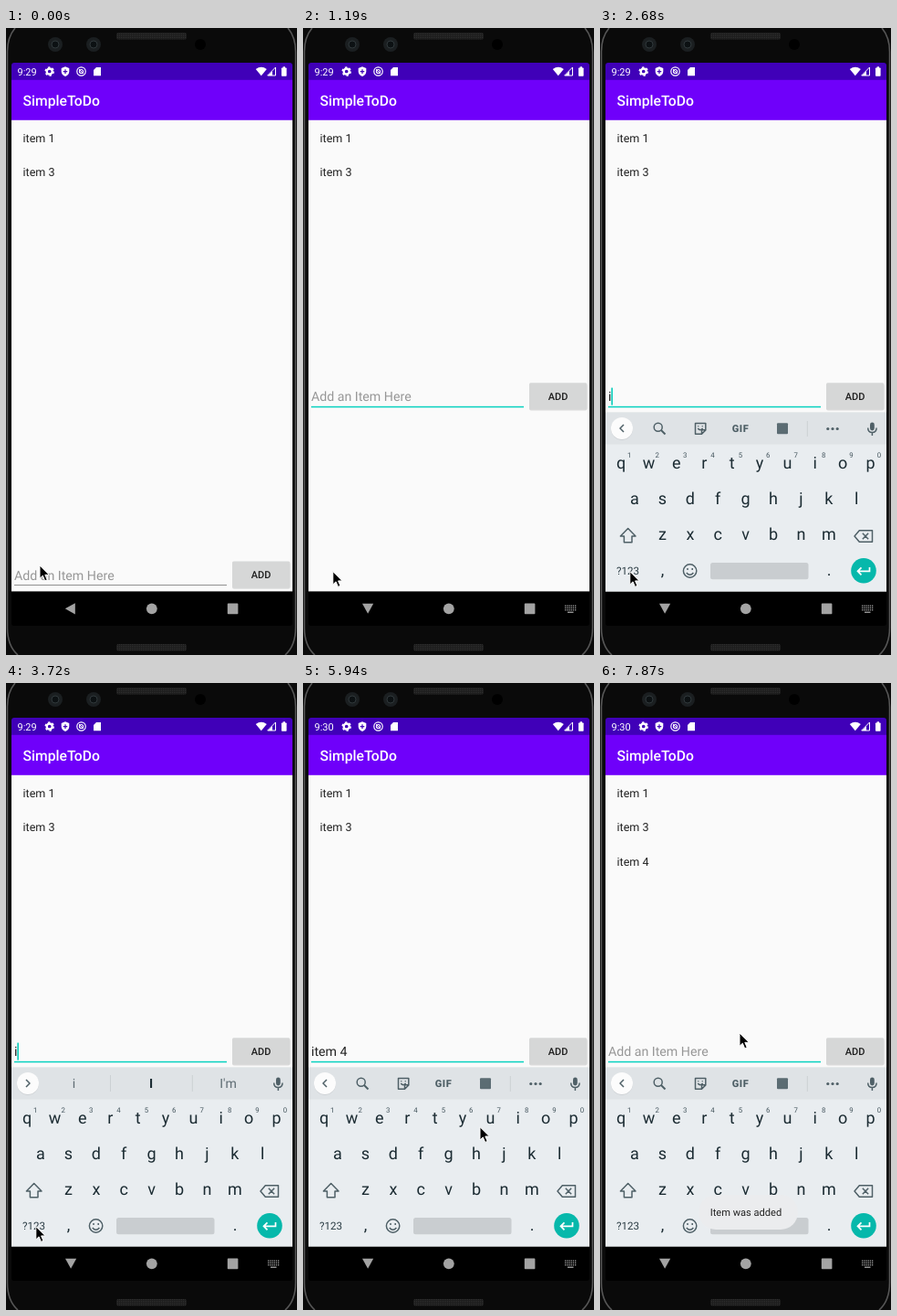
An HTML page that plays this animation: 319x686 px, repeating every 8000 ms.

```html
<!DOCTYPE html>
<html lang="en">
<head>
<meta charset="utf-8">
<title>To-do demo</title>
<style>
  html, body { margin: 0; width: 100%; height: 100%; overflow: hidden; background: #0a0a0a; }
  svg { display: block; width: 100%; height: 100%; }
  text { font-family: Roboto, sans-serif; white-space: pre; text-rendering: geometricPrecision; }
  .mid { text-anchor: middle; }
  .item { font-size: 12.55px; fill: #222; }
  .edit { font-size: 14.2px; }
  .key { font-size: 18px; fill: #1b2b32; text-anchor: middle; }
  .num { font-size: 7.8px; fill: #43545c; text-anchor: middle; }
  .word { font-size: 14.1px; fill: #5d6b72; text-anchor: middle; }
  .line { fill: none; stroke: #4f6067; stroke-width: 1.5; stroke-linejoin: round; }
</style>
</head>
<body>
<svg viewBox="0 0 319 686" preserveAspectRatio="none">
  <defs>
    <pattern id="mesh" width="2" height="2" patternUnits="userSpaceOnUse">
      <rect width="2" height="2" fill="#1d1d1d"/><rect width="1" height="1" fill="#303030"/>
    </pattern>
    <clipPath id="screen"><rect x="6" y="38" width="308" height="616" rx="3"/></clipPath>
    <clipPath id="app"><rect x="6" y="38" width="308" height="578.4"/></clipPath>
  </defs>

  <!-- phone body -->
  <rect width="319" height="686" fill="#0a0a0a"/>
  <g fill="none" stroke="#575757" stroke-width="1.6">
    <path d="M10 0Q1.5 10 1.5 26V656Q1.5 676 13 686"/>
    <path d="M309 0Q317.5 10 317.5 26V656Q317.5 676 306 686"/>
  </g>
  <rect x="121" y="5" width="77" height="7.5" rx="2" fill="url(#mesh)"/>
  <rect x="121" y="674" width="77" height="7.5" rx="2" fill="url(#mesh)"/>
  <g fill="#1b1f21">
    <circle cx="54" cy="18" r="8"/><circle cx="96" cy="18" r="8"/>
  </g>
  <g fill="#0c1113" stroke="#30383b">
    <circle cx="54" cy="18" r="4"/><circle cx="96" cy="18" r="4"/>
  </g>
  <circle cx="213" cy="18" r="6" fill="#000"/>

  <g clip-path="url(#screen)">
    <rect x="6" y="38" width="308" height="616" fill="#000"/>
    <rect x="6" y="57" width="308" height="559.4" fill="#fafafa"/>
    <rect x="6" y="38" width="308" height="19" fill="#4000b8"/>
    <rect x="6" y="56.8" width="308" height="44" fill="#6f00fa"/>

    <!-- status bar -->
    <text id="clock" x="12.5" y="51.5" font-size="11" fill="#fff"></text>
    <g fill="#fff">
      <circle cx="47.7" cy="47.5" r="3" fill="none" stroke="#fff" stroke-width="2.3"/>
      <circle cx="47.7" cy="47.5" r="4.5" fill="none" stroke="#fff" stroke-width="1.5" stroke-dasharray="2.4 2.31"/>
      <path d="M65 42.3L69.3 44V47.5Q69.3 51.3 65 53Q60.7 51.3 60.7 47.5V44Z"/>
      <path d="M65 45.2V50M62.7 47.6H67.3" stroke="#4000b8" stroke-width="1.2"/>
      <circle cx="82.5" cy="47.5" r="4.7" fill="none" stroke="#fff" stroke-width="1.2"/>
      <circle cx="82.5" cy="47.5" r="2" fill="none" stroke="#fff" stroke-width="1.2"/>
      <path d="M80 45L85 50" stroke="#fff"/>
      <path d="M99 43H104V52.3H96V46Z"/>
      <path d="M273.8 45Q279.8 40.7 285.8 45L279.8 52.3Z"/>
      <path d="M295.5 43V52H286.7Z" fill="none" stroke="#fff"/>
      <path d="M292 47V52H287.5Z"/>
      <rect x="302" y="43.5" width="5.6" height="9.3" rx=".7"/><rect x="303.6" y="42.3" width="2.4" height="2"/>
    </g>

    <text x="18.5" y="85" font-size="15.7" font-weight="500" fill="#fff">SimpleToDo</text>
    <text class="item" x="18.5" y="124.5">item 1</text>
    <text class="item" x="18.5" y="162">item 3</text>
    <text class="item" id="added" x="18.5" y="199.7">item 4</text>
    <rect id="ghost" x="49" y="323" width="242" height="57" fill="#f9f9f9"/>

    <!-- input row -->
    <g id="row">
      <text class="edit" id="hint" x="9" y="408.3" fill="#979797">Add an Item Here</text>
      <text class="edit" id="field" x="9" y="408.3" fill="#212121"></text>
      <rect id="under" x="9" width="233"/>
      <rect id="caret" y="393.6" width="1.6" height="19" fill="#08cdbb"/>
      <rect x="248" y="389.5" width="63.5" height="29" rx="2" fill="#000" opacity=".13"/>
      <rect id="button" x="248" y="388.2" width="63.3" height="29" rx="1.5"/>
      <text class="mid" x="279.6" y="406.6" font-size="11" font-weight="500" fill="#1c1c1c">ADD</text>
    </g>

    <!-- keyboard -->
    <g clip-path="url(#app)"><g id="board">
      <rect x="6" y="420.5" width="308" height="198" fill="#e9edf0"/>
      <rect x="6" y="420.5" width="308" height="35" fill="#dfe3e6"/>
      <circle cx="24" cy="438.8" r="12" fill="#c9cdd0"/>
      <circle cx="24" cy="438" r="12" fill="#fcfcfc"/>
      <path class="line" id="chevron"/>
      <g id="tools">
        <g class="line">
          <circle cx="63.7" cy="436.7" r="4.5"/><path d="M67 440L71.5 444.5" stroke-width="2"/>
          <path d="M104.5 432.5H115.8V440L111.5 444.3H104.5Z M115.8 439.8H111.5V444.3 M107.3 438Q109.8 441.5 112.7 438"/>
          <path d="M107.7 435.3V436.3M112.3 435.3V436.3"/>
        </g>
        <text class="mid" x="154" y="442.3" font-size="11" font-weight="900" letter-spacing=".6" fill="#4f6067">GIF</text>
        <rect x="194" y="432.3" width="12" height="12" rx="1" fill="#5b6c73"/>
        <path d="M227.3 430V447" stroke="#cbd0d3"/>
        <g fill="#4f6067">
          <circle cx="249.8" cy="438.5" r="1.6"/><circle cx="255" cy="438.5" r="1.6"/><circle cx="260.2" cy="438.5" r="1.6"/>
        </g>
      </g>
      <g id="words">
        <path d="M114.5 429V447M204.3 429V447" stroke="#cbd0d3"/>
        <text class="word" x="74.5" y="443.3"></text>
        <text class="word" x="159" y="443.3"></text>
        <text class="word" x="243.5" y="443.3"></text>
      </g>
      <rect x="296" y="431.5" width="4.8" height="9" rx="2.4" fill="#4f6067"/>
      <path class="line" d="M293.7 437.5Q293.7 442.5 298.4 442.5T303.1 437.5M298.4 442.5V446"/>
      <g id="keys"></g>
      <path class="line" d="M30.7 547.5L39 556H35V562.8H26.4V556H22.4Z"/>
      <path class="line" d="M279 556L284.3 549.7H298.5V562.3H284.3ZM287.8 552.8L294.2 559.2M294.2 552.8L287.8 559.2"/>
      <text class="mid" x="30.5" y="598.3" font-size="11.6" fill="#2b3c44">?123</text>
      <text class="key" x="68.5" y="599">,</text>
      <text class="key" x="251" y="599">.</text>
      <g class="line">
        <circle cx="98.6" cy="594" r="7.2"/><path d="M94.8 596Q98.6 600.5 102.4 596"/>
        <path d="M96 591V593M101.2 591V593"/>
      </g>
      <rect x="121" y="585" width="107.5" height="18.3" rx="2.5" fill="#c9cdd0"/>
      <circle cx="289" cy="593.8" r="13.8" fill="#06b8ab"/>
      <path d="M295.5 590V594.3H283M286.5 590.3L282.5 594.3L286.5 598.3" fill="none" stroke="#fff" stroke-width="1.7"/>
    </g></g>

    <g id="toast">
      <rect x="108" y="560" width="109" height="38" rx="19" fill="#ebecee"/>
      <text class="mid" x="160" y="583" font-size="11.1" fill="#222">Item was added</text>
    </g>

    <!-- navigation bar -->
    <g fill="#a3a3a3">
      <path id="back" d="M64.8 635.3L75.8 629.2V641.4Z"/>
      <circle cx="159.8" cy="635.3" r="5.9"/>
      <rect x="242.8" y="629.6" width="11.6" height="11.6" rx=".8"/>
      <g id="switcher"></g>
    </g>
  </g>

  <path id="mouse" d="M0 0V14.3L3.3 11.2L5.7 16.8L8.2 15.7L5.8 10.3H10.4Z" fill="#000" stroke="#fff" stroke-width="1"/>
</svg>
<script>
const LOOP = 8000, TICK = 148.6;
const $ = id => document.getElementById(id);
const show = (id, on) => $(id).setAttribute('display', on ? 'inline' : 'none');
const clamp = v => Math.max(0, Math.min(1, v));
const ease = v => v * v * (3 - 2 * v);

const label = (cls, x, y, s) => `<text class="${cls}" x="${x}" y="${y}">${s}</text>`;
const keyRow = (chars, x, y) => [...chars].map((c, i) => label('key', x + i * 30.4, y, c)).join('');
$('keys').innerHTML = keyRow('qwertyuiop', 23, 481.5) + keyRow('asdfghjkl', 38, 520.7) +
  keyRow('zxcvbnm', 68.5, 560.3) +
  [...'1234567890'].map((c, i) => label('num', 32.3 + i * 30.4, 469.7, c)).join('');

let dots = '';
for (let r = 0; r < 3; r++)
  for (let c = 0; c < 6; c++)
    dots += `<rect x="${287 + c * 2.2}" y="${631.5 + r * 2.3}" width="1.3" height="1.3"/>`;
$('switcher').innerHTML = dots + '<rect x="290" y="638.6" width="6.5" height="1.3"/>';

const typed = [[0, ''], [2680, 'i'], [4170, 'it'], [4320, 'ite'], [4470, 'item'], [5060, 'item '], [5210, 'item 4'], [7120, '']];
const hints = [[0, null], [2830, ['i', 'I', "I'm"]], [4170, ['it', 'It', "it's"]], [4320, ['ite', 'item', 'items']],
  [4620, ['item', 'items', 'Item']], [5060, ['I', 'is', 'and']], [5210, null]];
const caretOn = [[290, 890], [1630, 2230], [2680, 3280], [3720, 5650], [6240, 6680], [7120, 7570]];
// time, x, y of the pointer tip
const path = [[0, 37, 588], [100, 37, 588], [440, 32.8, 594.6], [5560, 32.8, 594.6], [6240, 303, 412],
  [6380, 303, 405], [6680, 274, 399], [7869, 274, 399], [7870, 153, 383]];

const at = (list, t) => list.filter(e => e[0] <= t).pop()[1];

function pointer(t) {
  const i = path.findIndex(p => p[0] > t);
  if (i < 0) return path[path.length - 1].slice(1);
  const [t0, x0, y0] = path[i - 1], [t1, x1, y1] = path[i];
  const k = ease((t - t0) / (t1 - t0));
  return [x0 + (x1 - x0) * k, y0 + (y1 - y0) * k];
}

function draw(t) {
  const step = Math.floor((t + 8) / TICK) * TICK;
  const focus = t >= 290, raised = t >= 740;

  $('clock').textContent = t < 4470 ? '9:29' : '9:30';
  show('added', t >= 7120);
  show('ghost', t >= 6680 && t < 6980);

  const text = at(typed, t);
  $('row').setAttribute('transform', `translate(0 ${raised ? 0 : 195.3})`);
  $('field').textContent = text;
  show('hint', !text);
  const under = $('under');
  under.setAttribute('y', 413.8);
  under.setAttribute('height', focus ? 1.5 : 0.9);
  under.setAttribute('fill', focus ? '#08d1bf' : '#858585');
  show('caret', caretOn.some(([a, b]) => t >= a && t < b));
  $('caret').setAttribute('x', 9.3 + (text ? $('field').getComputedTextLength() - .4 : 0));
  $('button').setAttribute('fill', t >= 6980 && t < 7270 ? '#c6c7c7' : '#d6d7d7');

  show('board', t >= 1630);
  $('board').setAttribute('transform', `translate(0 ${t < 1780 ? .8 : 0})`);
  const words = at(hints, t);
  show('tools', !words);
  show('words', words);
  $('chevron').setAttribute('d', words ? 'M22 434L26 438L22 442' : 'M26 434L22 438L26 442');
  if (words) $('words').querySelectorAll('text').forEach((el, i) => {
    const strong = i === 1 && t < 5060;
    el.textContent = words[i];
    el.setAttribute('style', strong ? 'font-weight:700;fill:#1b2b32' : '');
  });

  const turn = clamp((step - 600) / 440);
  $('back').setAttribute('transform', `rotate(${-90 * ease(turn)} 70.7 634.9)`);
  $('switcher').setAttribute('opacity', turn);
  const fade = clamp((step - 7080) / 330);
  show('toast', fade > 0);
  $('toast').setAttribute('opacity', fade);

  const [x, y] = pointer(t >= 7870 ? t : Math.min(step, 7868));
  $('mouse').setAttribute('transform', `translate(${x.toFixed(1)} ${y.toFixed(1)})`);
}

const start = performance.now();
function frame() {
  draw((performance.now() - start) % LOOP);
  requestAnimationFrame(frame);
}
frame();
</script>
</body>
</html>
```
